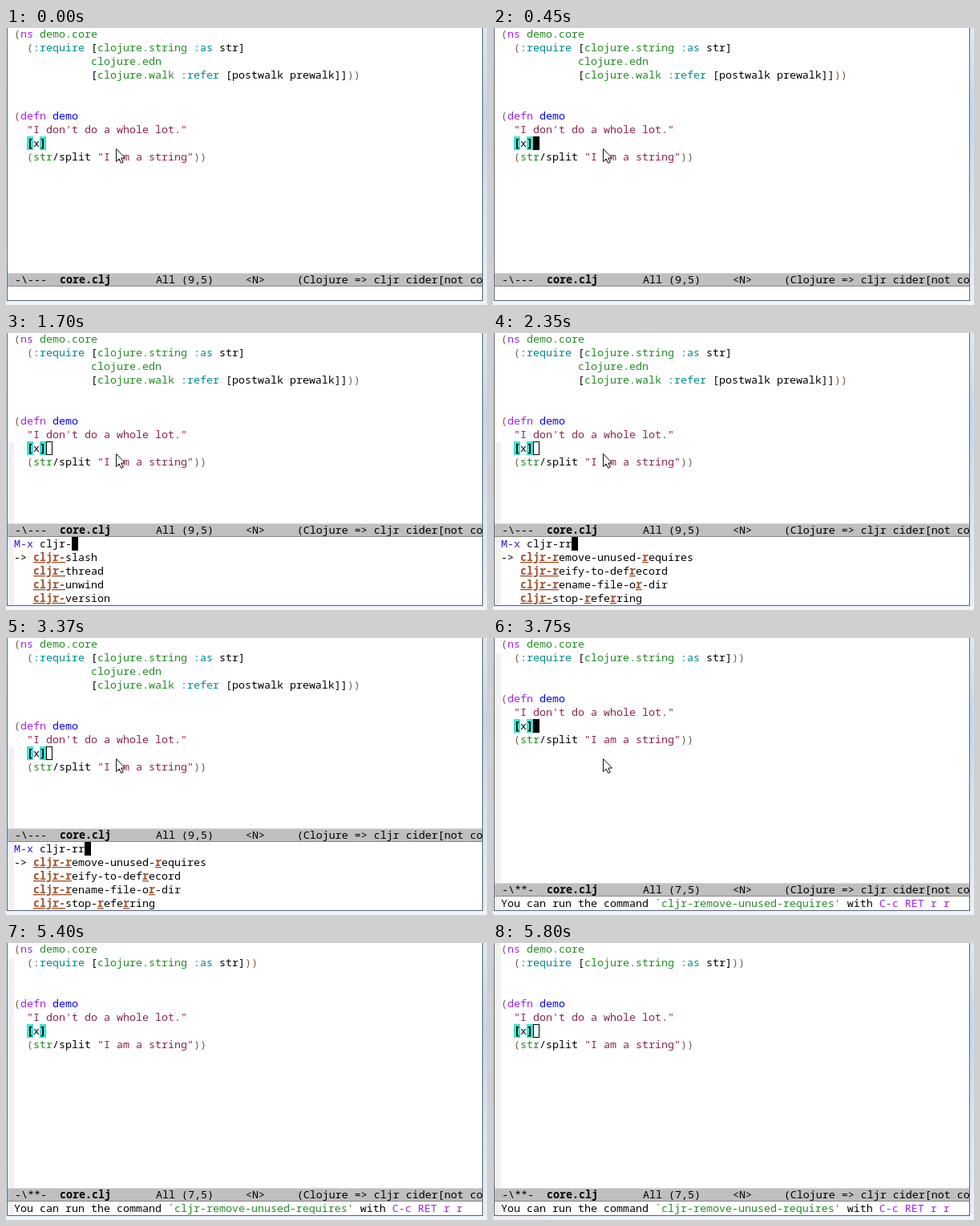
These frames come from a looping animation (600 px wide and 345 px high, 5820 ms). An HTML page:

```html
<!DOCTYPE html>
<html lang="en">
<head>
<meta charset="utf-8">
<title>Removing unused requires</title>
<style>
  html, body { margin: 0; width: 100%; height: 100%; overflow: hidden; background: #fff; }
  svg { display: block; }
  text { font: 13.3333px "Noto Sans Mono", "DejaVu Sans Mono", monospace; white-space: pre; fill: #000; }
  .purple { fill: #a020f0; }
  .green { fill: #228b22; }
  .cyan { fill: #008b8b; }
  .blue { fill: #0000ff; }
  .string { fill: #8b2252; }
  .paren { fill: #75604c; }
  .prompt { fill: #3a14d2; }
  .match { fill: #a0522d; font-weight: bold; text-decoration: underline; }
  .bold { font-weight: bold; }
</style>
</head>
<body>
<svg id="stage" width="600" height="345" viewBox="0 0 600 345"></svg>
<script>
const LOOP = 5820, CELL = 8, ROW = 17, LEFT = 10;
const stage = document.getElementById('stage');

// Inline markup: {class|text}
const CLASSES = { p: 'purple', g: 'green', c: 'cyan', b: 'blue', s: 'string', o: 'paren', m: 'prompt', u: 'match', B: 'bold' };

const FUNCTION = [
  '({p|defn} {b|demo}',
  '  {s|"I don\'t do a whole lot."}',
  '  {B|[}x{B|]}',
  '  ({g|str}/split {s|"I am a string"}))'
];
const BEFORE = [
  '({p|ns} {g|demo.core}',
  '  ({c|:require} [{g|clojure.string} {c|:as} str]',
  '            {g|clojure.edn}',
  '            [{g|clojure.walk} {c|:refer} [postwalk prewalk]]))',
  '', '', ...FUNCTION
];
const AFTER = [
  BEFORE[0],
  BEFORE[1] + '))',
  '', '', ...FUNCTION
];

const SHORT = ['ag', 'cd', 'cf', 'gl'];
const PREFIXED = ['slash', 'thread', 'unwind', 'version'];
const REFACTOR = [
  '{u|cljr-r}emove-unused-{u|r}equires',
  '{u|cljr-r}eify-to-def{u|r}ecord',
  '{u|cljr-r}ename-file-o{u|r}-dir',
  '{u|cljr-}stop-{u|r}efe{u|r}ring'
];
const TYPING = [
  [610, '', SHORT],
  [1580, 'clj', PREFIXED.map(name => `{u|clj}r-${name}`)],
  [1700, 'cljr-', PREFIXED.map(name => `{u|cljr-}${name}`)],
  [2230, 'cljr-r', REFACTOR],
  [2350, 'cljr-rr', REFACTOR]
];
const POINTER = [[0, 137, 150], [5160, 260, 185], [5280, 562, 258], [5400, 620, 290]];

const latest = (steps, t) => steps.filter(step => step[0] <= t).pop();
const within = (t, from, to) => t >= from && t < to;

const rect = (x, y, w, h, fill) => `<rect x="${x}" y="${y}" width="${w}" height="${h}" fill="${fill}"/>`;

function line(markup, top, x = LEFT) {
  const spans = markup
    .replace(/&/g, '&amp;').replace(/</g, '&lt;').replace(/>/g, '&gt;')
    .replace(/\{(\w)\|([^}]*)\}/g, (_, key, body) => `<tspan class="${CLASSES[key]}">${body}</tspan>`);
  return `<text x="${x}" y="${top + 13}">${spans}</text>`;
}

const lines = (list, top) => list.map((markup, i) => line(markup, top + i * ROW)).join('');

const solidCursor = (column, top) => rect(LEFT + column * CELL, top, CELL, ROW, '#000');
const hollowCursor = (column, top) =>
  `<rect x="${LEFT + column * CELL + .5}" y="${top + .5}" width="${CELL - 1}" height="${ROW - 1}" fill="none" stroke="#000"/>`;

function buffer(code, row, cursor) {
  const top = row * ROW - 1;
  const brackets = [2, 4].map(col => rect(LEFT + col * CELL, top, CELL, ROW, '#40e0d0')).join('');
  const colored = code.map(text => text.replace(/[()]/g, '{o|$&}'));
  return brackets + lines(colored, -1) + (cursor ? cursor(5, top) : '');
}

function modeLine(top, flags, position) {
  return rect(2, top, 592, ROW, '#bfbfbf') + rect(2, top, 592, 1, '#dcdcdc') + rect(2, top + ROW - 1, 592, 1, '#858585') +
    line(` -\\${flags}-  {B|core.clj}       All ${position}     <N>     (Clojure => cljr cider[not connected])`, top, 3);
}

function pointer(x, y) {
  return `<path transform="translate(${x} ${y})" d="M.5 .5V16.5L4.2 13L6.6 18.3L9.2 17.2L6.8 12H11.5Z" fill="#fff" stroke="#111"/>`;
}

function windowFrame(ending) {
  return `<defs>
    <clipPath id="inside"><rect x="2" width="592" height="339"/></clipPath>
    <linearGradient id="glass" x2="0" y2="1">
      <stop stop-color="#dce9f6"/><stop offset=".3" stop-color="#c3d8ec"/>
      <stop offset=".6" stop-color="#d3e4f4"/><stop offset="1" stop-color="#e6f0fa"/>
    </linearGradient></defs>` +
    rect(0, 0, 600, 345, 'url(#glass)') + rect(0, 340, 600, 5, '#eff5fb') +
    (ending ? rect(0, 341, 68, 4, '#f0f0f0') : '') +
    rect(1, 0, 594, 340, '#59636e') + rect(2, 0, 592, 339, '#fff');
}

function picture(t) {
  const ending = t >= 5800;
  let content;
  if (t < 610) {
    content = buffer(BEFORE, 8, t >= 450 && solidCursor) + modeLine(305, '--', '(9,5)');
  } else if (t < 3750) {
    const [, typed, choices] = latest(TYPING, t);
    const hidden = within(t, 1150, 1580) || within(t, 2910, 3370);
    content = rect(2, 136, 8, 203, '#f2f2f2') +
      buffer(BEFORE, 8, hollowCursor) + modeLine(237, '--', '(9,5)') +
      lines([`{m|M-x} ${typed}`, ...choices.map((name, i) => (i ? '   ' : '-> ') + name)], 254) +
      (hidden ? '' : solidCursor(4 + typed.length, 254));
  } else {
    const lit = within(t, 3750, 4300) || within(t, 4760, 5280);
    const fringeTop = ending ? 0 : 19;
    content = rect(2, fringeTop, 8, 339 - fringeTop, '#f2f2f2') +
      buffer(AFTER, 6, ending ? hollowCursor : lit && solidCursor) + modeLine(305, '**', '(7,5)') +
      line("You can run the command {g|`cljr-remove-unused-requires'} with {p|C-c RET r r}", 322);
  }
  const [, x, y] = latest(POINTER, t);
  return windowFrame(ending) + `<g clip-path="url(#inside)">${content}${pointer(x, y)}</g>`;
}

let shown = '';
function draw() {
  const next = picture(performance.now() % LOOP);
  if (next !== shown) stage.innerHTML = shown = next;
  requestAnimationFrame(draw);
}
draw();
</script>
</body>
</html>
```
